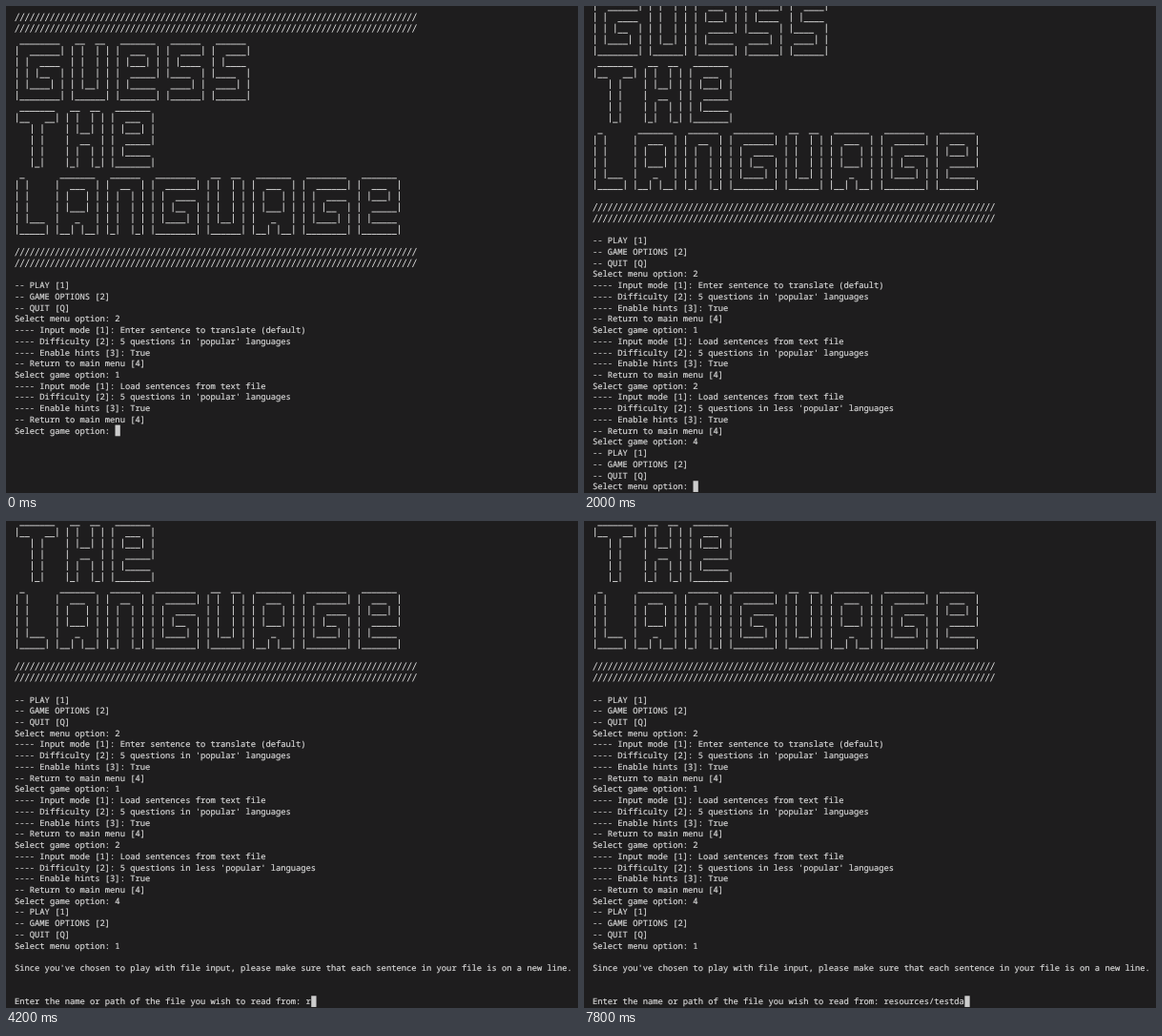
Animation of 600 by 511 pixels, one loop 8 s. Source, as an HTML page:

```html
<!DOCTYPE html>
<html lang="en">
<head>
<meta charset="utf-8">
<title>Guess the language</title>
<style>
html, body { margin: 0; width: 100%; height: 100%; overflow: hidden; background: #1e1d1e; }
svg { display: block; width: 600px; height: 511px; }
text {
  font-family: "Noto Sans Mono", "DejaVu Sans Mono", monospace;
  font-size: 8.79px;
  fill: #d8d8d8;
  stroke: #d8d8d8;
  stroke-width: 0.18px;
  white-space: pre;
  text-rendering: geometricPrecision;
  font-variant-ligatures: none;
}
path { fill: none; stroke: #d4d4d4; stroke-width: 0.95px; }
</style>
</head>
<body>
<svg viewBox="0 0 600 511">
  <g id="screen"></g>
  <rect id="cursor" width="5.3" height="11.7" fill="#cccccc"/>
</svg>
<script>
const LOOP = 8000;
const LEFT = 9, TOP = 5.6, CHAR = 5.275, LINE = 11.73, BASE = 9;
const ROWS = 43;

const glyphs = {
  G: [" ________ ", "|  ______|", "| |  ____ ", "| | |__  |", "| |____| |", "|________|"],
  U: [" __  __ ", "| |  | |", "| |  | |", "| |  | |", "| |__| |", "|______|"],
  E: [" _______ ", "|  ___  |", "| |___| |", "|  _____|", "| |_____ ", "|_______|"],
  S: [" ______ ", "|  ____|", "| |____ ", "|____  |", " ____| |", "|______|"],
  T: [" _______ ", "|__   __|", "   | |   ", "   | |   ", "   | |   ", "   |_|   "],
  H: [" __  __ ", "| |  | |", "| |__| |", "|  __  |", "| |  | |", "|_|  |_|"],
  L: [" _     ", "| |    ", "| |    ", "| |    ", "| |___ ", "|_____|"],
  A: [" _______ ", "|  ___  |", "| |   | |", "| |___| |", "|   _   |", "|__| |__|"],
  N: [" ______ ", "|  __  |", "| |  | |", "| |  | |", "| |  | |", "|_|  |_|"]
};

const banner = word => glyphs.G.map((_, row) => [...word].map(c => glyphs[c][row]).join(" "));
const rule = "/".repeat(80);
const mainMenu = ["-- PLAY [1]", "-- GAME OPTIONS [2]", "-- QUIT [Q]"];
const gameMenu = (mode, level) => [
  "---- Input mode [1]: " + mode,
  `---- Difficulty [2]: 5 questions in ${level} languages`,
  "---- Enable hints [3]: True",
  "-- Return to main menu [4]"
];
const fromFile = "Load sentences from text file";
const menuAsk = "Select menu option: ";
const gameAsk = "Select game option: ";

// Each block ends with a prompt; `keys` lists [time, characters typed so far].
const blocks = [
  {
    at: 0,
    lines: [
      rule, rule, ...banner("GUESS"), ...banner("THE"), ...banner("LANGUAGE"), "", rule, rule, "",
      ...mainMenu, menuAsk + "2",
      ...gameMenu("Enter sentence to translate (default)", "'popular'"), gameAsk + "1",
      ...gameMenu(fromFile, "'popular'")
    ],
    prompt: gameAsk, input: "2", keys: [[400, 1]]
  },
  {
    at: 600,
    lines: gameMenu(fromFile, "less 'popular'"),
    prompt: gameAsk, input: "4", keys: [[1800, 1]]
  },
  { at: 2000, lines: mainMenu, prompt: menuAsk, input: "1", keys: [[2400, 1]] },
  {
    at: 2600,
    lines: [
      "",
      "Since you've chosen to play with file input, please make sure that each sentence in your file is on a new line.",
      "", ""
    ],
    prompt: "Enter the name or path of the file you wish to read from: ",
    input: "resources/testda",
    keys: [[4200, 1], [4400, 3], [4600, 5], [4800, 6], [5400, 7], [5800, 8], [6400, 9],
           [6800, 10], [7000, 11], [7200, 12], [7400, 13], [7600, 15], [7800, 16]]
  }
];

function linesAt(t) {
  const out = [];
  for (const b of blocks) {
    if (t < b.at) break;
    const typed = b.keys.reduce((n, [time, count]) => t >= time ? count : n, 0);
    out.push(...b.lines, b.prompt + b.input.slice(0, typed));
  }
  return out;
}

// Banner and rule lines are strokes inside character cells.
const strokes = {
  "|": x => `M${x + CHAR / 2} 1.3V11.2`,
  "_": x => `M${x} 11h${CHAR}`,
  "/": x => `M${x + 0.7} 10.4L${x + 4.7} 2`,
  " ": () => ""
};
const isArt = s => /^[ |_\/]+$/.test(s);
const artPath = s => [...s].map((c, i) => strokes[c](i * CHAR)).join("");

const screen = document.getElementById("screen");
const cursor = document.getElementById("cursor");

function add(parent, tag, attrs) {
  const el = document.createElementNS("http://www.w3.org/2000/svg", tag);
  for (const k in attrs) el.setAttribute(k, attrs[k]);
  return parent.appendChild(el);
}

// One extra row above shows the part of a line left in the top padding.
const rows = Array.from({ length: ROWS + 1 }, (_, i) => {
  const g = add(screen, "g", { transform: `translate(${LEFT} ${(TOP + (i - 1) * LINE).toFixed(2)})` });
  return { text: add(g, "text", { y: BASE, "xml:space": "preserve" }), art: add(g, "path", { d: "" }), line: "" };
});

function setRow(row, line) {
  if (row.line === line) return;
  const art = isArt(line);
  row.line = line;
  row.text.textContent = art ? "" : line;
  row.art.setAttribute("d", art ? artPath(line) : "");
}

function draw(t) {
  const lines = linesAt(t);
  const last = lines.length - 1;
  const first = Math.max(0, lines.length - ROWS);
  rows.forEach((row, i) => setRow(row, lines[first + i - 1] || ""));
  cursor.setAttribute("x", LEFT + lines[last].length * CHAR);
  cursor.setAttribute("y", TOP + (last - first) * LINE);
}

const start = performance.now();
function tick() {
  draw((performance.now() - start) % LOOP);
  requestAnimationFrame(tick);
}
tick();
</script>
</body>
</html>
```
